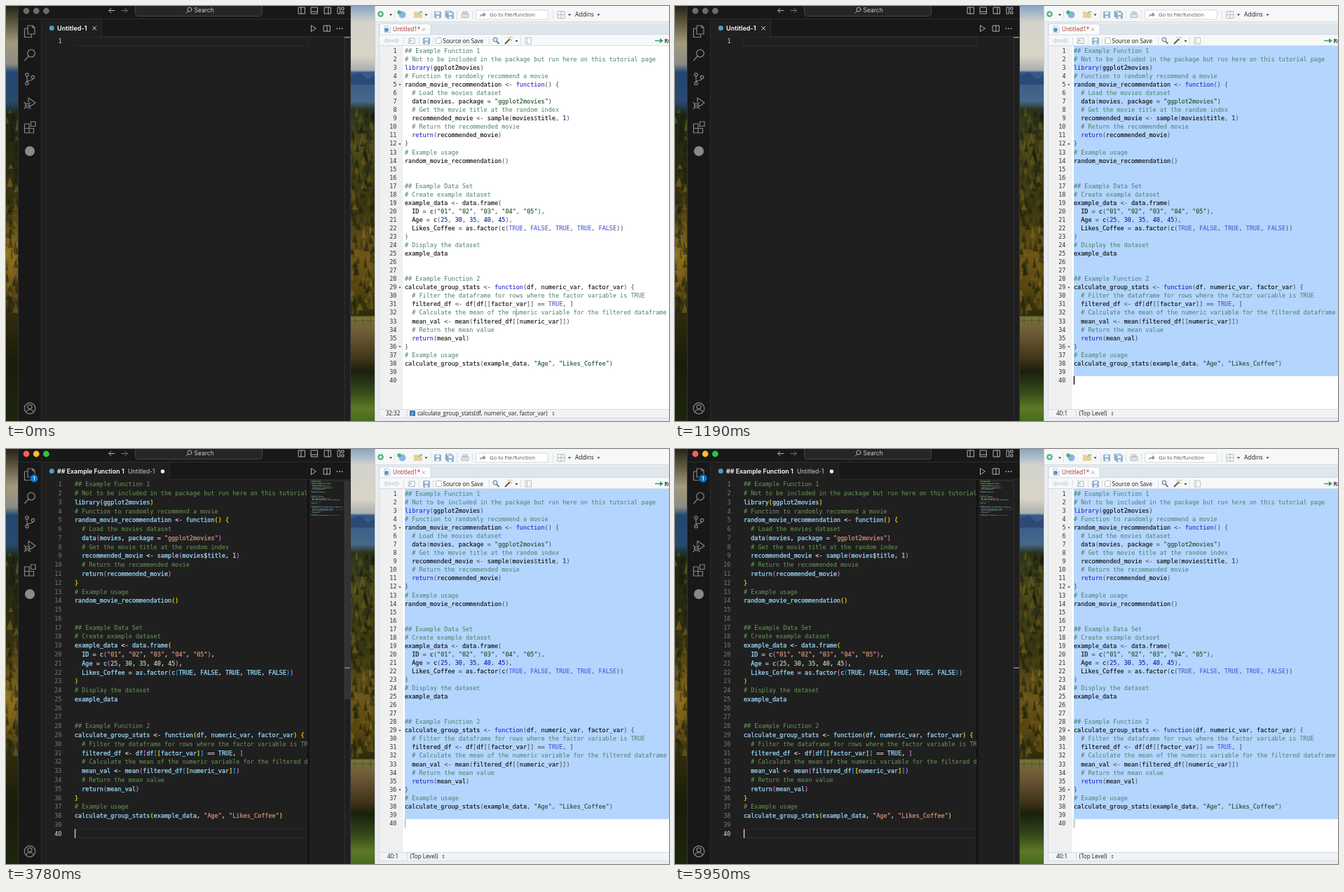
Write an HTML page that moves like this. It is 946x592 px and loops after 6440 ms.

```html
<!DOCTYPE html>
<html lang="en">
<head>
<meta charset="utf-8">
<title>Copying a script between editors</title>
<style>
html, body { margin: 0; width: 100%; height: 100%; overflow: hidden; background: #1f1f1f; }
svg { display: block; width: 946px; height: 592px; }
text { white-space: pre; }
.mono text { font: 8.5px "DejaVu Sans Mono", monospace; }
.num { text-anchor: end; }
.ui { font: 8.1px "Open Sans", sans-serif; fill: #1c1c1c; }
.vs { font: 8.5px Inter, sans-serif; fill: #ccc; }
.icon { fill: none; stroke: #868686; stroke-width: 1.2; stroke-linejoin: round; stroke-linecap: round; }
.bright { stroke: #b0b0b0; stroke-width: 1; }
.tool { fill: none; stroke: #7c8c9c; stroke-width: 1; }
</style>
</head>
<body>
<svg viewBox="0 0 946 592">
  <defs>
    <linearGradient id="westSky" x2="0" y2="1">
      <stop offset="0" stop-color="#26241a"/><stop offset=".04" stop-color="#5c573f"/>
      <stop offset=".09" stop-color="#a39a7c"/><stop offset=".14" stop-color="#8c8b83"/>
      <stop offset=".16" stop-color="#24466f"/><stop offset=".23" stop-color="#284a70"/>
      <stop offset=".26" stop-color="#1c2716"/><stop offset=".4" stop-color="#2c2b10"/>
      <stop offset=".52" stop-color="#594812"/><stop offset=".6" stop-color="#94731d"/>
      <stop offset=".66" stop-color="#735818"/><stop offset=".74" stop-color="#302b0e"/>
      <stop offset=".86" stop-color="#191c0a"/><stop offset="1" stop-color="#1d250d"/>
    </linearGradient>
    <linearGradient id="midSky" x2="0" y2="1">
      <stop offset="0" stop-color="#89a5c4"/><stop offset=".04" stop-color="#d3d3cb"/>
      <stop offset=".12" stop-color="#d9d4c5"/><stop offset=".155" stop-color="#a9afb0"/>
      <stop offset=".16" stop-color="#35588a"/><stop offset=".23" stop-color="#466888"/>
      <stop offset=".25" stop-color="#28331b"/><stop offset=".34" stop-color="#4f4a1a"/>
      <stop offset=".48" stop-color="#39350f"/><stop offset=".6" stop-color="#6d5617"/>
      <stop offset=".68" stop-color="#57460f"/><stop offset=".745" stop-color="#2d290c"/>
      <stop offset=".75" stop-color="#77743a"/><stop offset=".79" stop-color="#6d5835"/>
      <stop offset=".85" stop-color="#403519"/><stop offset=".88" stop-color="#19200c"/>
      <stop offset=".93" stop-color="#35491a"/><stop offset=".97" stop-color="#5c7a27"/>
      <stop offset="1" stop-color="#466a1e"/>
    </linearGradient>
    <linearGradient id="shade"><stop offset="0" stop-color="#0c0c0c"/><stop offset="1" stop-color="#1f1f1f"/></linearGradient>
    <clipPath id="west"><path d="M0 0H18V592H0Z"/></clipPath>
    <clipPath id="mid"><path d="M491 0H527V592H491Z"/></clipPath>
    <clipPath id="codeClip"><path d="M52 40H430.5V592H52Z"/></clipPath>
    <clipPath id="mapClip"><path d="M434 40H482.5V110H434Z"/></clipPath>
    <path id="caret" d="M-2 -1H2L0 1.6Z" fill="#333"/>
  </defs>

  <!-- wallpaper -->
  <g clip-path="url(#west)"><rect width="18" height="592" fill="url(#westSky)"/><g id="westTrees"/></g>
  <g clip-path="url(#mid)">
    <rect x="491" width="36" height="592" fill="url(#midSky)"/>
    <path d="M491 100L505 95 516 104 527 99V112H491Z" fill="#2c4a76"/>
    <g id="midTrees"/>
    <path d="M492 449H526M498 445V454M509 445V454M520 444V454" stroke="#4f4924" stroke-width=".8"/>
  </g>

  <!-- dark editor -->
  <path d="M17 0H492V592H17Z" fill="#181818"/>
  <path d="M51 44H492V592H51Z" fill="#1f1f1f"/>
  <path d="M17.5 0V592M491.5 0V592" stroke="#343434"/>
  <path d="M18 18.5H491M50.5 19V592M51 43.5H491" stroke="#2b2b2b"/>
  <g id="lights"><circle cx="29" cy="7" r="4.4"/><circle cx="43.2" cy="7" r="4.4"/><circle cx="57.4" cy="7" r="4.4"/></g>
  <rect x="184.5" y="-6" width="181" height="20.5" rx="4" fill="#262626" stroke="#454545"/>
  <text class="vs" x="268.5" y="9.3">Search</text>
  <g class="icon bright">
    <path d="M155 6.5H147M150 3.3L146.8 6.5 150 9.7"/>
    <path d="M165 6.5H173M170 3.3L173.2 6.5 170 9.7" stroke="#777"/>
    <circle cx="262" cy="5" r="3"/><path d="M260 7.2L257 10.2"/>
    <path d="M417.5 2H426.5V11H417.5ZM421 2V11M435.5 2H444.5V11H435.5ZM435.5 8H444.5M454.5 2H463.5V11H454.5ZM460 2V11M473.5 2H476.5V11H473.5ZM479 2H482V5.2H479ZM479 8H482V11H479Z"/>
    <path d="M435.5 28V36.5L442 32.2ZM453.5 28H462.5V36H453.5ZM458 28V36"/>
  </g>
  <g fill="#bbb"><circle cx="472.5" cy="32.2" r=".9"/><circle cx="476" cy="32.2" r=".9"/><circle cx="479.5" cy="32.2" r=".9"/></g>
  <g class="icon">
    <path d="M31 28H38L41 31V40H31ZM31 32H26.5V44.5H36.500V40M38 28V31H41"/>
    <circle cx="36" cy="67.5" r="5.3"/><path d="M32.2 71.5L26.8 77.5"/>
    <circle cx="30" cy="98" r="2.2"/><circle cx="30" cy="110.5" r="2.2"/><circle cx="38.5" cy="101.5" r="2.2"/>
    <path d="M30 100.2V108.3M38.5 103.7C38.5 107 31 105 30 108"/>
    <path d="M32 137V131L42 138 34.5 143.2"/>
    <circle cx="30.5" cy="142" r="3"/><path d="M27.5 142H33.5M27.8 139L26 137.5M27.6 145L26 146.6M33.2 139L34.5 138M33.3 145L35 146.6"/>
    <path d="M26.5 168H33V181H26.5ZM26.5 174.5H39.5V181H33M35.5 165H42V171.5H35.5Z"/>
    <circle cx="34" cy="574" r="7.8"/><circle cx="34" cy="571.8" r="3"/><path d="M28.5 579.5C29.5 574.5 38.5 574.5 39.5 579.5"/>
  </g>
  <circle cx="34" cy="207" r="7" fill="#8a8a8a"/>
  <rect id="tab" x="51" y="19" height="25" fill="#1f1f1f"/>
  <path id="tabEdge" fill="none" stroke="#2b2b2b"/>
  <circle cx="65.3" cy="31.5" r="3.5" fill="#4b9ccb"/>
  <g id="emptyTab">
    <text class="vs" x="73" y="34.7" style="font-size:9.1px;font-weight:600;fill:#fff">Untitled-1</text>
    <path d="M123.5 29L129 34.5M129 29L123.5 34.5" stroke="#ddd"/>
  </g>
  <g id="fullTab">
    <text class="vs" x="73" y="34.7" style="font-size:8.9px;font-weight:600;fill:#fff">## Example Function 1</text>
    <text class="vs" x="174" y="34.7" fill="#aaa">Untitled-1</text>
    <circle cx="223.5" cy="32" r="2.7" fill="#eee"/>
  </g>
  <g id="badge"><circle cx="40" cy="42" r="6" fill="#0078d4" stroke="#181818"/><text class="vs" x="40" y="44.6" text-anchor="middle" style="font-size:7px;font-weight:600;fill:#fff">1</text></g>
  <path d="M483.5 44V592" stroke="#2d2d2d"/>
  <rect id="lineBox" x="97.5" width="333" height="12" fill="none" stroke="#2b2b2b"/>
  <rect id="mark" x="483" width="8" height="1.5" fill="#8d8d8d"/>
  <g class="mono">
    <text id="one" class="num" x="79.5" y="53.2" fill="#ccc">1</text>
    <g id="pasted">
      <g id="darkNums"/>
      <g clip-path="url(#codeClip)"><g id="darkCode"/></g>
      <rect x="430" y="44" width="4" height="548" fill="url(#shade)"/>
    </g>
    <g id="minimap" clip-path="url(#mapClip)">
      <g id="mini" transform="translate(422.5 39) scale(.133 .107)"><use href="#darkCode"/></g>
      <use href="#mini"/>
    </g>
  </g>
  <rect id="slider" x="483" y="45" width="8" height="312" fill="#797979"/>
  <rect id="darkCaret" x="98" width="1.2" height="13" fill="#d5d5d5"/>

  <!-- light editor -->
  <path d="M526 0H946V592H526Z" fill="#f5f7f8"/>
  <path d="M526 22H946V592H526Z" fill="#e9edf1"/>
  <path d="M532 41H946V588H532Z" fill="#fff"/>
  <path d="M532 41H946V57H532Z" fill="#f6f8f9"/>
  <path d="M532 57H566.5V575H532Z" fill="#f0f0f0"/>
  <path d="M532 575H946V587H532Z" fill="#f1f3f5"/>
  <path d="M532 25H946V41H532Z" fill="#dfe6ec"/>
  <path d="M533 41V28Q533 25.5 536 25.5H603Q606 25.5 606 28V41Z" fill="#fbfcfc" stroke="#c5ced6" stroke-width=".7"/>
  <path d="M526 22.5H946M606 40.5H946M532 56.5H946M532 575.5H946M532 587.5H946M532.5 25V588M572.5 576V587" fill="none" stroke="#cfd6dc" stroke-width=".8"/>
  <path d="M526.5 0V592" stroke="#c9ced4"/>

  <g opacity=".85">
    <circle cx="534.5" cy="11.5" r="4.3" fill="#2ba566"/><path d="M532 11.5H537M534.5 9V14" stroke="#fff" stroke-width="1.3"/>
    <circle cx="565.5" cy="12.5" r="5" fill="#75aadb"/><circle cx="561" cy="9" r="2.8" fill="#2ba566"/>
    <path d="M582 8H587L588 10H594V17H582Z" fill="#e6cb84"/><path d="M589 11C590 7 593 8 594 9" fill="none" stroke="#2ba566" stroke-width="1.3"/>
    <g id="disks"/>
  </g>
  <path d="M650 11H660V16.5H650ZM652 8H658V11H652Z" fill="#dce2e7" stroke="#a6b0ba" stroke-width=".8"/>
  <path d="M554.5 6V19M607.5 6V19M643.5 6V19M665.5 6V19M780.5 6V19" stroke="#d8dde1" stroke-width=".8"/>
  <rect x="670.5" y="6" width="103" height="13" rx="2" fill="#fff" stroke="#ccd2d7" stroke-width=".8"/>
  <path d="M676 16C676 12 679 11.5 681 11.5V9L685 12.5 681 15.5V13.5C679 13.5 677.5 14 676 16Z" fill="#8b959e"/>
  <text class="ui" x="690" y="15.2" style="font-size:7.7px;fill:#555">Go to file/function</text>
  <path class="tool" d="M787 7.5H797V17.5H787ZM792 7.5V17.5M787 12.5H797" style="stroke:#b4bac0"/>
  <text class="ui" x="812" y="15.2" style="font-size:8.4px">Addins</text>
  <use href="#caret" x="549" y="12.5"/><use href="#caret" x="599.5" y="12.5"/><use href="#caret" x="804" y="12.5"/><use href="#caret" x="845.5" y="12.5"/><use href="#caret" x="728.5" y="50"/>

  <path d="M540 28.5H546L548 30.5V38H540Z" fill="#fff" stroke="#9baab8" stroke-width=".7"/><circle cx="543" cy="34" r="3" fill="#5c93cd"/>
  <text class="ui" x="552" y="36.2" style="fill:#a8282c">Untitled1*</text>
  <path d="M594 31.5L598 35.5M598 31.5L594 35.5" stroke="#a3aab0"/>
  <path d="M539 49.5L543 46V48H549V51H543V53ZM561 49.5L557 46V48H551V51H557V53Z" fill="#e6eaed" stroke="#c3cad0" stroke-width=".7"/>
  <path class="tool" d="M575 46H583V53.5H575ZM573 53L578 48.5M575.5 48.5H578V51" style="stroke:#a9b6c3"/>
  <path d="M567.5 44V55M589.5 44V55M609.5 44V55M689.5 44V55M734.5 44V55" stroke="#d5dade" stroke-width=".8"/>
  <rect x="613.5" y="45.5" width="8" height="8" rx="1" fill="#fff" stroke="#a7adb2" stroke-width=".8"/>
  <text class="ui" x="623.5" y="52.6">Source on Save</text>
  <circle cx="698" cy="48" r="3" fill="#d8eaf8" stroke="#55718d"/><path d="M700.3 50.5L703.5 54" stroke="#555" stroke-width="1.6"/>
  <path d="M712 54L719 47" stroke="#555" stroke-width="1.8"/><path d="M720 43.5V46M722 48.5H719.5M716 44L717 46M723 44.5L721.5 46" stroke="#d19b31"/>
  <path class="tool" d="M741 45H749.5V54H741ZM743.5 45V54" style="stroke:#b9c3cb"/>
  <path d="M926 48.7H933V46L938 49.5 933 53V50.3H926Z" fill="#2ba566"/>
  <text class="ui" x="939.5" y="52.6" style="font-weight:600">Run</text>

  <rect id="selection" x="569" y="57" width="377" height="471" fill="#b4d5fe"/>
  <g class="mono"><g id="lightNums"/><g id="lightCode"/></g>
  <rect id="lightCaret" width="1.3" height="12"/>
  <text id="pos" class="ui" x="552" y="584.3" text-anchor="middle"></text>
  <g id="scope">
    <rect x="576" y="577" width="8" height="8" rx="1" fill="#3f7fc0"/>
    <text x="578.5" y="583.6" style="font:italic 7px serif" fill="#fff">f</text>
  </g>
  <text id="scopeName" class="ui" y="584.3"></text>
  <path id="updown" d="M-2 -1H2L0 -3.5ZM-2 1H2L0 3.5Z" fill="#555"/>
</svg>

<script>
const LOOP = 6440;
const $ = id => document.getElementById(id);
const code = `## Example Function 1
# Not to be included in the package but run here on this tutorial page
library(ggplot2movies)
# Function to randomly recommend a movie
random_movie_recommendation <- function() {
  # Load the movies dataset
  data(movies, package = "ggplot2movies")
  # Get the movie title at the random index
  recommended_movie <- sample(movies$title, 1)
  # Return the recommended movie
  return(recommended_movie)
}
# Example usage
random_movie_recommendation()


## Example Data Set
# Create example dataset
example_data <- data.frame(
  ID = c("01", "02", "03", "04", "05"),
  Age = c(25, 30, 35, 40, 45),
  Likes_Coffee = as.factor(c(TRUE, FALSE, TRUE, TRUE, FALSE))
)
# Display the dataset
example_data


## Example Function 2
calculate_group_stats <- function(df, numeric_var, factor_var) {
  # Filter the dataframe for rows where the factor variable is TRUE
  filtered_df <- df[df[[factor_var]] == TRUE, ]
  # Calculate the mean of the numeric variable for the filtered dataframe
  mean_val <- mean(filtered_df[[numeric_var]])
  # Return the mean value
  return(mean_val)
}
# Example usage
calculate_group_stats(example_data, "Age", "Likes_Coffee")

`.split("\n");

const light = { comment: "#4c806a", string: "#17481f", key: "#2222c4", bool: "#4c56d4", num: "#1818a0", name: "#000", bracket: ["#4c525a"], other: "#4c525a" };
const dark = { comment: "#6a9955", string: "#ce9178", key: "#9cdcfe", bool: "#9cdcfe", num: "#b5cea8", name: "#9cdcfe", bracket: ["#ffd700", "#da70d6", "#179fff"], other: "#d4d4d4" };
const token = /(?<comment>#.*)|(?<string>"[^"]*")|(?<key>\b(?:function|library|return)\b)|(?<bool>\b(?:TRUE|FALSE)\b)|(?<name>[A-Za-z_][\w.]*)|(?<num>\d+)|(?<bracket>[()[\]{}])|(?<other>[^\w()[\]{}"#]+)/g;

function add(tag, attrs, parent, text) {
  const node = document.createElementNS("http://www.w3.org/2000/svg", tag);
  for (const k in attrs) node.setAttribute(k, attrs[k]);
  if (text) node.textContent = text;
  return parent.appendChild(node);
}

function writeCode(parent, x, y, pitch, theme, weight) {
  let depth = 0;
  code.forEach((line, i) => {
    const row = add("text", { x, y: y + i * pitch }, parent);
    for (const m of line.matchAll(token)) {
      const kind = Object.keys(m.groups).find(k => m.groups[k] !== undefined);
      let fill = theme[kind];
      if (kind === "bracket") {
        const opens = "([{".includes(m[0]);
        if (!opens) depth--;
        fill = fill[depth % fill.length];
        if (opens) depth++;
      }
      add("tspan", { fill, stroke: fill, "stroke-width": kind === "comment" ? 0 : weight }, row, m[0]);
    }
  });
}

function writeNumbers(parent, x, y, pitch, colour) {
  code.forEach((_, i) => add("text", { class: "num", x, y: y + i * pitch, fill: colour(i + 1) }, parent, i + 1));
}

writeCode($("darkCode"), 98, 53.2, 12.78, dark, .25);
writeNumbers($("darkNums"), 79.5, 53.2, 12.78, n => n === 40 ? "#ddd" : "#747b83");
writeCode($("lightCode"), 569, 66.9, 12.05, light, .08);
writeNumbers($("lightNums"), 557.5, 66.9, 12.05, () => "#333");
for (const [line, flip] of [[5, 1], [12, -1], [29, 1], [36, -1]])
  add("use", { href: "#caret", transform: `translate(562 ${52 + line * 12.05}) scale(.8 ${flip * .8})` }, $("lightNums"));

for (const [x, y] of [[616, 12.5], [631.5, 11.5], [634, 13.5], [600, 50]]) {
  add("rect", { x: x - 4.5, y: y - 4.5, width: 9, height: 9, rx: 1, fill: "#7fa6cd", stroke: "#5f87b0", "stroke-width": .6 }, $("disks"));
  add("path", { d: `M${x - 2.5} ${y - 4}h5v3.5h-5ZM${x - 2} ${y + 1.5}h4v3h-4Z`, fill: "#f2f6fa" }, $("disks"));
}

let seed = 11;
const rnd = () => (seed = seed * 16807 % 2147483647) / 2147483647;
function plant(parent, x, width, count) {
  for (let i = 0; i < count; i++) {
    const y = 150 + 284 * i / count, h = 6 + rnd() * 13, w = 2 + rnd() * 3, cx = x + rnd() * width;
    const gold = rnd() < (y > 310 ? .45 : .2);
    const fill = gold ? `hsl(${42 + rnd() * 8} 60% ${18 + rnd() * 16}%)` : `hsl(${62 + rnd() * 25} 40% ${6 + rnd() * 9}%)`;
    add("path", { d: `M${cx} ${y - h / 2}l${w} ${h}h${-2 * w}Z`, fill, opacity: .55 }, parent);
  }
}
plant($("westTrees"), 0, 18, 90);
plant($("midTrees"), 491, 36, 170);

// Each span is [from, to) in ms.
const spans = {
  darkCaret: [[2940, 3500], [3710, 4340], [4900, 5390], [5950, LOOP]],
  lightCaret: [[0, 70], [350, 980], [1190, 1820], [2310, 2870], [2940, LOOP]],
  selection: [[1190, LOOP]],
  scope: [[0, 140]],
  emptyTab: [[0, 3710]],
  one: [[0, 3710]],
  fullTab: [[3710, LOOP]],
  pasted: [[3710, LOOP]],
  badge: [[3780, LOOP]],
  minimap: [[3780, LOOP]]
};
const set = (id, attrs) => { for (const k in attrs) $(id).setAttribute(k, attrs[k]); };

function draw(t) {
  for (const id in spans)
    set(id, { visibility: spans[id].some(([a, b]) => t >= a && t < b) ? "visible" : "hidden" });

  const focused = t >= 2940, full = t >= 3710;
  const colours = focused ? ["#fe5f57", "#febc2e", "#28c840"] : ["#6b6b6b", "#6b6b6b", "#6b6b6b"];
  [...$("lights").children].forEach((c, i) => c.setAttribute("fill", colours[i]));

  const edge = full ? 234 : 137;
  set("tab", { width: edge - 51 });
  set("tabEdge", { d: `M${edge - .5} 19V43.5` });
  set("lineBox", { y: full ? 542.5 : 44.5 });
  set("mark", { y: full ? 311.5 : 44 });
  set("darkCaret", { y: full ? 542 : 44 });
  const fade = t < 4200 ? (t - 3710) / 100 : (5110 - t) / 910;
  set("slider", { opacity: .32 * Math.max(0, Math.min(1, fade)) });

  const [line, col] = t < 140 ? [32, 32] : t < 1190 ? [21, 31] : [40, 1];
  set("lightCaret", { x: 568.8 + (col - 1) * 5.117, y: 58 + (line - 1) * 12.05, fill: focused || t < 70 ? "#a9a9a9" : "#000" });
  $("pos").textContent = line + ":" + col;
  const inside = t < 140;
  $("scopeName").textContent = inside ? "calculate_group_stats(df, numeric_var, factor_var)" : "(Top Level)";
  set("scopeName", { x: inside ? 587 : 576.5 });
  set("updown", { transform: `translate(${inside ? 781 : 624} 581.5) scale(.8)` });
}

const start = performance.now();
function tick() {
  draw((performance.now() - start) % LOOP);
  requestAnimationFrame(tick);
}
tick();
</script>
</body>
</html>
```
